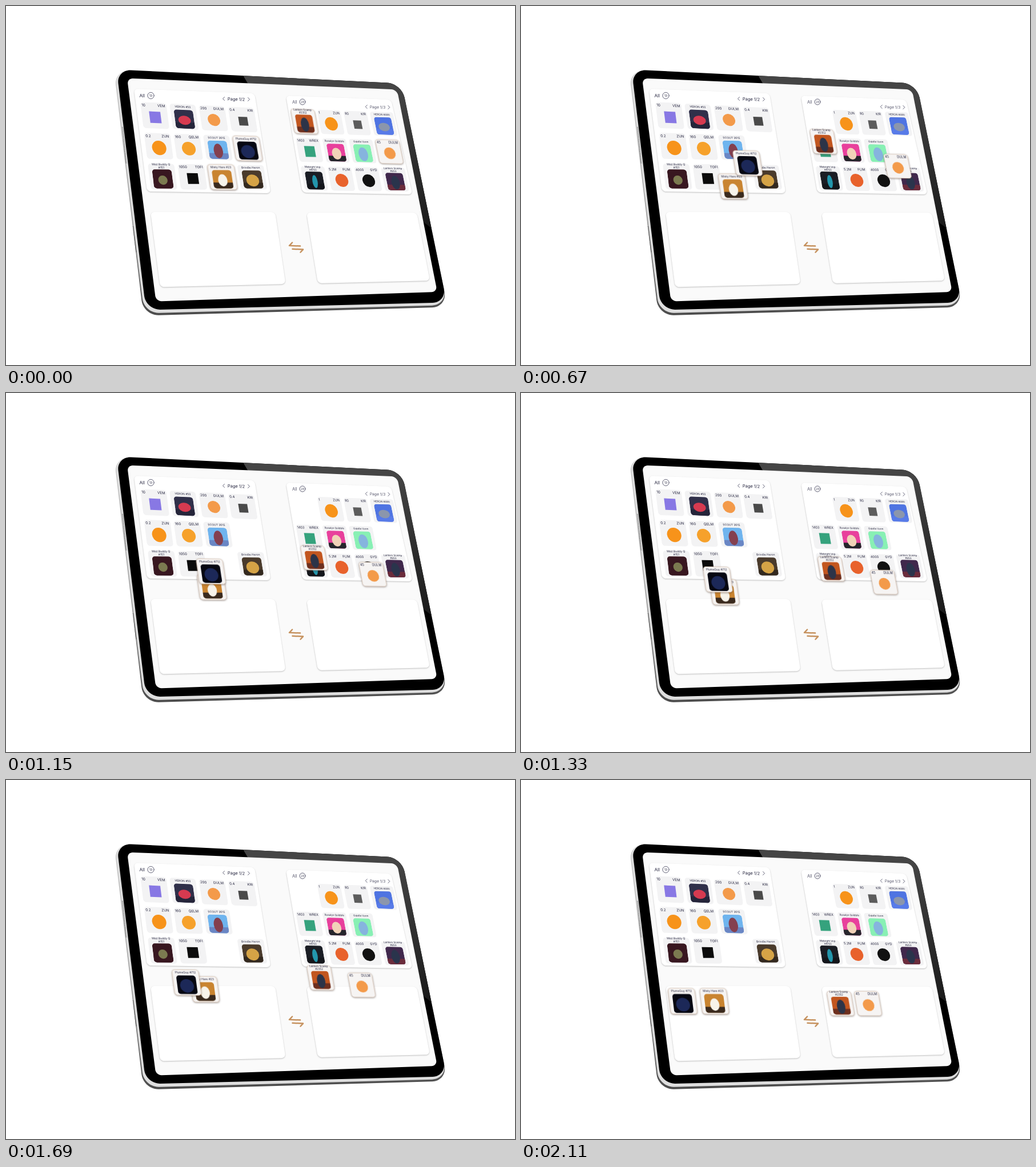
Animation of 891x629 px, one loop 2.48 s. Source, as an HTML page:

```html
<!DOCTYPE html>
<html lang="en">
<head>
<meta charset="utf-8">
<title>Trade tablet</title>
<style>
  html, body { margin: 0; width: 100%; height: 100%; overflow: hidden; background: #fff; }
  svg { display: block; width: 891px; height: 629px; font-family: Inter, Roboto, sans-serif; fill: #25253f; }
  .panel { fill: #fff; filter: drop-shadow(0 1.5px 1.2px rgba(0, 0, 0, .24)); }
  .cell { fill: #f3f3f4; }
  .picked .cell { fill: #f6f4f3; stroke: #e2d1c3; stroke-width: 1; filter: drop-shadow(0 1px 1.5px rgba(60, 40, 30, .5)); }
  .line { fill: none; stroke: #3a3a55; stroke-width: .8; stroke-linecap: round; stroke-linejoin: round; }
  .swap { fill: none; stroke: #c6925f; stroke-width: 2.5; stroke-linecap: round; stroke-linejoin: round; }
  .picked { animation: drop 2480ms infinite linear; }
  /* 59 steps of 30 ms between two rests */
  @keyframes drop {
    0% { transform: var(--from); }
    13.67% { transform: var(--from); animation-timing-function: steps(59, end); }
    85.04%, 100% { transform: var(--to); }
  }
</style>
</head>
<body>
<svg id="stage" viewBox="0 0 891 629">
  <defs>
    <linearGradient id="metal" gradientUnits="userSpaceOnUse" x1="0" y1="110" x2="0" y2="540">
      <stop offset="0" stop-color="#c2c2c2"/><stop offset=".6" stop-color="#9a9a9a"/>
      <stop offset="1" stop-color="#4c4c4c"/>
    </linearGradient>
    <linearGradient id="glare" gradientUnits="userSpaceOnUse" x1="690" y1="140" x2="738" y2="385">
      <stop offset="0" stop-color="#454545"/><stop offset="1" stop-color="#1b1b1b"/>
    </linearGradient>
    <clipPath id="face"></clipPath>
    <clipPath id="pic"><rect x="-17" y="-16.5" width="34" height="33" rx="5"/></clipPath>
  </defs>
</svg>
<script>
const stage = document.getElementById('stage');
const NS = 'http://www.w3.org/2000/svg';

function add(parent, tag, attrs = {}, text = '') {
  const el = document.createElementNS(NS, tag);
  for (const k in attrs) el.setAttribute(k, attrs[k]);
  el.textContent = text;
  parent.appendChild(el);
  return el;
}

const mix = (a, b, t) => a.map((v, i) => v + (b[i] - v) * t);

// Closed path through the corners, each rounded over length r
function rounded(pts, r) {
  const n = pts.length;
  return pts.map((p, i) => {
    const toward = (q, len) => mix(p, q, len / Math.hypot(q[0] - p[0], q[1] - p[1]));
    const prev = pts[(i + n - 1) % n], next = pts[(i + 1) % n];
    return `${i ? 'L' : 'M'}${toward(prev, r)} C${toward(prev, r * .45)} ${toward(next, r * .45)} ${toward(next, r)}`;
  }).join(' ') + 'Z';
}

const shape = (pts, r, attrs, parent = stage) => add(parent, 'path', { d: rounded(pts, r), ...attrs });

const write = (parent, x, y, size, text, anchor = 'start', more = {}) =>
  add(parent, 'text', { x, y, 'font-size': size, 'text-anchor': anchor, ...more }, text);

// Tablet
const bezel = [[193.5, 111.3], [692.5, 135.8], [771.5, 519.5], [245, 532.5]];
shape([[189, 112], [693, 136], [773, 527.5], [240.5, 542.5]], 27, { fill: 'url(#metal)' });
shape([[190, 112], [693, 136], [772, 524], [242, 538.5]], 26, { fill: '#dedede' });
for (const d of ['M204 212L210.5 276', 'M222.5 386L228 432'])
  add(stage, 'path', { d, fill: 'none', stroke: '#444', 'stroke-width': 1.4, 'stroke-dasharray': '1 1.2' });
shape(bezel, 25, { fill: '#000' });
shape(bezel, 25, {}, document.getElementById('face'));
add(stage, 'path', { d: 'M408 110L427 142L680 150L722 372L746 390L790 380L700 110Z', fill: 'url(#glare)', 'clip-path': 'url(#face)' });
add(stage, 'circle', { cx: 725, cy: 315, r: 1.2, fill: '#2c3038' });
shape([[212, 126.5], [684.5, 146.5], [755, 501], [262.5, 517.5]], 10, { fill: '#fafafa' });

// Panels
for (const pts of [
  [[224, 145], [435, 153], [463.5, 328], [247, 325]],
  [[490, 157], [674, 164], [711.5, 330], [519, 327]],
  [[253, 361], [471, 361], [489.5, 487], [270, 492.5]],
  [[526, 362], [719, 362], [742, 481], [546, 486]]
]) shape(pts, 7, { class: 'panel' });

function header(x, y, size, count, px, py, page, fill) {
  const g = add(stage, 'g', { fill });
  write(g, x, y + size * .36, size, 'All');
  add(g, 'circle', { cx: x + 20 * size / 8, cy: y, r: size * .7, class: 'line' });
  write(g, x + 20 * size / 8, y + 2, 5.4, count, 'middle');
  write(g, px, py + size * .36, size * .94, page, 'middle', { transform: `rotate(1.5 ${px} ${py})` });
  const w = size * 2.75;
  for (const s of [-1, 1])
    add(g, 'path', { class: 'line', d: `M${px + s * (w - 1.5)} ${py - 3 + s * .5}l${s * 3} 3l${-s * 3} 3` });
}
header(233.5, 157, 8, '13', 403, 163, 'Page 1/2', '#25253f');
header(501, 168, 7.2, '28', 650.5, 177, 'Page 1/3', '#55556a');

add(stage, 'path', { class: 'swap', d: 'M501 414.5L496 419.8L515 420.6 M501.5 425.8L520 426.6L515.5 431.5' });

// Cells: a coin is [amount, ticker, shape, colour, radius],
// a picture is [labels, sky, ground, figure colour, rx, ry]
const coin = (amount, name, kind, fill, r) => g => {
  write(g, -21, -15.3, 6.2, amount);
  write(g, 20.5, -15.3, 6.2, name, 'end');
  if (kind === 'circle') add(g, 'circle', { cx: .5, cy: 3, r, fill });
  else add(g, 'rect', { x: .5 - r, y: 3 - r, width: 2 * r, height: 2 * r, fill });
};

const art = (labels, sky, ground, fill, rx, ry) => g => {
  labels.forEach((s, i) => write(g, 0, (labels.length > 1 ? -19.6 : -16) + i * 5.4, 5, s, 'middle'));
  const pic = add(g, 'g', { transform: 'translate(0 4)', 'clip-path': 'url(#pic)' });
  add(pic, 'rect', { x: -17, y: -17, width: 34, height: 34, fill: sky });
  add(pic, 'rect', { x: -17, y: 6, width: 34, height: 11, fill: ground });
  add(pic, 'ellipse', { cx: 0, cy: 2, rx, ry, fill });
};

const left = {
  corners: [[260.5, 192], [414.5, 199], [274, 299], [431, 300]],
  cells: [
    coin('10', 'VEM', 'square', '#8878e4', 10),
    art(['HERON #50'], '#30304a', '#25253a', '#d63a50', 11, 8),
    coin('200', 'DULM', 'circle', '#f39a4a', 11),
    coin('0.4', 'KIR', 'square', '#4a4a4a', 8),
    coin('0.2', 'ZUN', 'circle', '#f7931a', 12.5),
    coin('160', 'QELM', 'circle', '#f6a12b', 12),
    art(['SCOUT 3615'], '#6fb4ee', '#6a86c4', '#84404f', 8, 13),
    art(['PlumeGuy #712'], '#070812', '#070812', '#1c2858', 12, 12),
    art(['Mist Buddy Q', '#151'], '#381720', '#381720', '#7b7a50', 8, 8),
    coin('1050', 'TOFI', 'square', '#0b0b0b', 9.5),
    art(['Misty Hare #23'], '#c98430', '#3a2a1e', '#f7f3ea', 8, 11),
    art(['Brindle Heron'], '#4a3b2c', '#33291f', '#d5a346', 11, 11)
  ]
};

const right = {
  corners: [[522.5, 202.2], [661, 206.5], [540, 302], [681, 304]],
  cells: [
    art(['Lantern Scamp', '#2352'], '#c2561f', '#6d2f1e', '#2c3448', 8, 13),
    coin('1', 'ZUN', 'circle', '#f7931a', 12.5),
    coin('80', 'KIR', 'square', '#5c5c5c', 8),
    art(['HERON #480'], '#4f74e2', '#587be8', '#8b96ac', 11, 8),
    coin('1403', 'WREX', 'square', '#35a27d', 10),
    art(['Rosalyn Quibble'], '#e8409c', '#26262c', '#f1d3b8', 9, 11),
    art(['Odette Vonn'], '#88f0b4', '#88f0b4', '#86b4de', 9, 13),
    coin('45', 'DULM', 'circle', '#f39a4a', 11),
    art(['Midnight Imp', '#8150'], '#1a1d24', '#14161b', '#2396ac', 5, 12),
    coin('5.2M', 'PLIM', 'circle', '#e8622c', 12.3),
    coin('4000', 'GYD', 'circle', '#111', 12),
    art(['Lantern Scamp', '#653'], '#40284c', '#6b2c3c', '#2a344c', 8, 13)
  ]
};

// Maps a cell drawn around 0,0 at pitch 52 x 53 onto the tilted grid
const matrix = (du, dv, p) =>
  `matrix(${[du[0] / 52, du[1] / 52, dv[0] / 53, dv[1] / 53, ...p].map(n => +n.toFixed(4)).join(',')})`;

function place({ corners: [tl, tr, bl, br] }, i) {
  const u = i % 4 / 3, v = Math.floor(i / 4) / 2;
  const top = mix(tl, tr, u), low = mix(bl, br, u);
  const a = mix(tl, bl, v), b = mix(tr, br, v);
  return matrix([(b[0] - a[0]) / 3, (b[1] - a[1]) / 3], [(low[0] - top[0]) / 2, (low[1] - top[1]) / 2], mix(top, low, v));
}

function cell(grid, i) {
  const g = add(stage, 'g');
  add(g, 'rect', { class: 'cell', x: -23, y: -22.5, width: 46, height: 45, rx: 5 });
  grid.cells[i](g);
  return g;
}

const leftAxes = [[52, .2], [6.5, 53]], rightAxes = [[47, .2], [8.5, 50]];
const moves = [
  [left, 10, leftAxes, [338.5, 387.5]],
  [left, 7, leftAxes, [283, 387.5]],
  [right, 0, rightAxes, [559.5, 391.5]],
  [right, 7, rightAxes, [607.5, 391.5]]
];

for (const grid of [left, right])
  grid.cells.forEach((_, i) => {
    if (!moves.some(m => m[0] === grid && m[1] === i))
      cell(grid, i).setAttribute('transform', place(grid, i));
  });

for (const [grid, i, axes, end] of moves) {
  const g = cell(grid, i);
  g.setAttribute('class', 'picked');
  g.style.setProperty('--from', place(grid, i));
  g.style.setProperty('--to', matrix(...axes, end));
}
</script>
</body>
</html>
```
